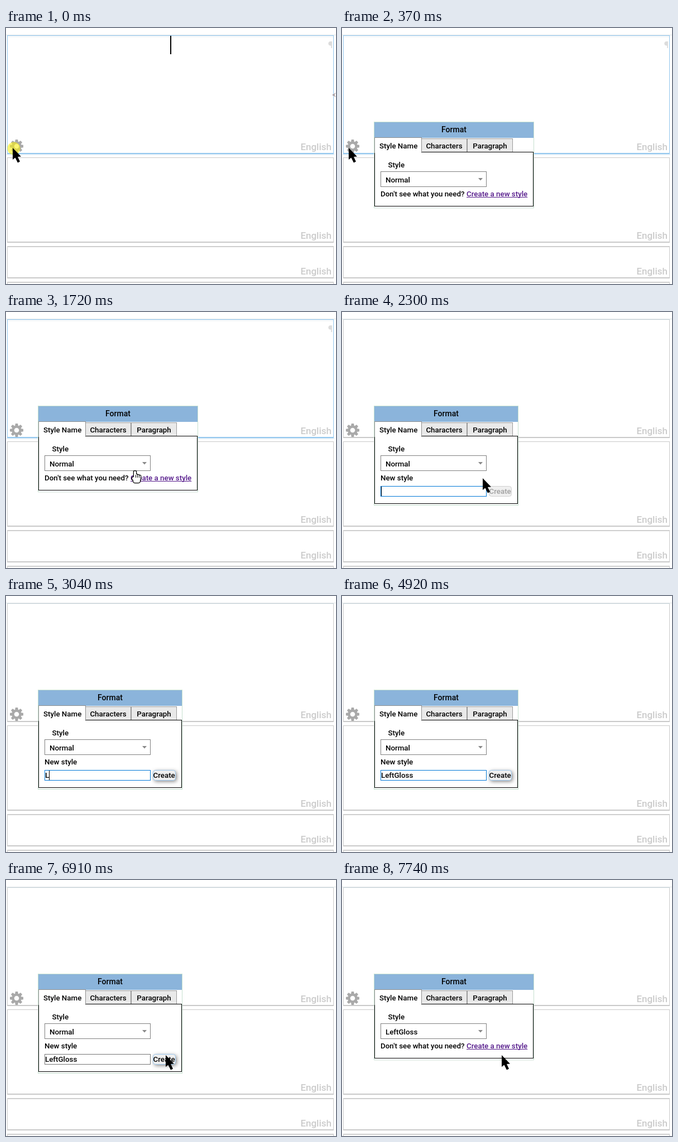
Write an HTML page with a canvas that moves like this. It is 591x459 px and loops after 8000 ms.

```html
<!DOCTYPE html>
<html lang="en">
<head>
<meta charset="utf-8">
<title>Create a style</title>
<style>
html, body { margin: 0; width: 100%; height: 100%; overflow: hidden; background: #fff; }
canvas { display: block; }
</style>
</head>
<body>
<canvas id="stage" width="591" height="459"></canvas>
<script>
const ctx = document.getElementById('stage').getContext('2d');
const LOOP = 8000;
const WORD = 'LeftGloss';
const OPEN = 370, TO_FORM = 2290, BLUR = 6790, TO_LIST = 7740;
const TYPE_START = 3040, KEY_GAP = 160, THINK = 420, BLINK = 480;
const HIDE = 2730, ENTER = 5850;

// Pointer stops: each move starts at a time, lasts ms and ends at x, y
const STOPS = [
  { at: 760, ms: 570, x: 137, y: 266 },
  { at: 1650, ms: 70, x: 231, y: 286 },
  { at: 1780, ms: 120, x: 252, y: 299 },
  { at: ENTER, ms: 0, x: 578, y: 57 },
  { at: ENTER, ms: 300, x: 293, y: 314 },
  { at: 6350, ms: 190, x: 286, y: 315 }
];

const within = (t, a, b) => t >= a && t < b;
const easeOut = k => 1 - (1 - k) ** 1.7;
const keyTime = i => TYPE_START + i * KEY_GAP + (i > 3 ? THINK : 0);

function rect(x, y, w, h, color) {
  ctx.fillStyle = color;
  ctx.fillRect(x, y, w, h);
}

function frame(x, y, w, h, color, fill) {
  if (fill) rect(x, y, w, h, fill);
  ctx.strokeStyle = color;
  ctx.lineWidth = 1;
  ctx.strokeRect(x + .5, y + .5, w - 1, h - 1);
}

function text(s, x, y, color = '#000', size = 13.33, align = 'left') {
  ctx.font = `500 ${size}px Roboto, "Noto Sans", sans-serif`;
  ctx.textAlign = align;
  ctx.fillStyle = color;
  ctx.fillText(s, x, y);
  return ctx.measureText(s).width;
}

function poly(x, y, pts, color) {
  ctx.beginPath();
  for (let i = 0; i < pts.length; i += 2) ctx.lineTo(x + pts[i], y + pts[i + 1]);
  ctx.closePath();
  ctx.fillStyle = color;
  ctx.fill();
}

function disc(x, y, r, color) {
  ctx.beginPath();
  ctx.arc(x, y, r, 0, 2 * Math.PI);
  ctx.fillStyle = color;
  ctx.fill();
}

function gear(x, y) {
  const color = '#a9a9a9';
  for (let i = 0; i < 8; i++) {
    ctx.save();
    ctx.translate(x, y);
    ctx.rotate(i * Math.PI / 4);
    poly(0, 0, [-3, -7, -2.2, -12, 2.2, -12, 3, -7], color);
    ctx.restore();
  }
  disc(x, y, 8.5, color);
  disc(x, y, 4.3, '#fff');
}

function box(y, h, color = '#c9c9c9') {
  frame(2, y, 585, h, color);
  rect(2, y + h - 2, 585, 1, color);
  if (h < 100) rect(2, y + 1, 585, 1, '#d4d4d4');
  text('English', 583, y + h - 7, '#cbcbcb', 17, 'right');
}

function page(t) {
  rect(0, 0, 591, 459, '#fff');
  rect(0, 12, 591, 1, '#e3e8ea');
  const focused = t < TO_FORM;
  if (focused) {
    rect(3, 14, 583, 3, '#f6f8f9');
    rect(1, 226, 587, 2, '#e4f0f9');
    text('¶', 585, 36, '#dcdcdc', 17, 'right');
  }
  box(13, 213, focused ? '#92c6ee' : '#c9c9c9');
  if (!focused) rect(2, 13, 585, 1, '#c3d0d6');
  box(232, 153);
  box(391, 58);
  box(455, 58);
  gear(19, 212);
  if (t < OPEN) rect(294, 14, 2, 33, '#000');
  if (t < 70) poly(584, 120, [0, 0, 7, -4, 4, 0, 7, 4], '#a89a9c');
}

function button(on) {
  ctx.save();
  if (on) {
    ctx.shadowColor = 'rgba(0,0,0,.5)';
    ctx.shadowBlur = 7;
    ctx.shadowOffsetX = ctx.shadowOffsetY = 2;
  }
  ctx.fillStyle = '#efefef';
  ctx.beginPath();
  ctx.roundRect(263.5, 312.5, 40, 18, 4);
  ctx.fill();
  ctx.restore();
  ctx.strokeStyle = on ? '#9cc8ee' : '#d0d0d0';
  ctx.lineWidth = 1;
  ctx.stroke();
  text('Create', 263.5, 326, on ? '#000' : '#a0a0a0');
}

function styleForm(t) {
  text('New style', 69, 302);
  frame(69, 312, 190, 19, t < BLUR ? '#0078d7' : '#767676', '#fff');
  let typed = 0;
  while (typed < WORD.length && t >= keyTime(typed)) typed++;
  const width = text(WORD.slice(0, typed), 70, 326);
  // The caret blinks only when typing rests
  const idle = typed ? t - keyTime(typed - 1) : 0;
  const caretOn = Math.floor((idle + 300) / BLINK) % 2 === 0;
  if (caretOn && t < BLUR) rect(Math.round(70 + width), 313, 1, 17, '#000');
  button(typed > 0);
}

function linkRow() {
  const color = '#551a8b';
  text("Don't see what you need?", 69, 302);
  const width = text('Create a new style', 223, 302, color);
  rect(223, 303, width, 1, color);
}

function tabs() {
  ['Characters', 'Paragraph'].forEach((name, i) => {
    const x = 142 + 82 * i;
    frame(x, 198, 82, 25, '#9a9a9a', '#e9e9e9');
    text(name, x + 41, 216, '#000', 13.33, 'center');
  });
  rect(142, 222, 164, 1, '#000');
  frame(58, 196, 85, 28, '#8e8e8e', '#fff');
  rect(59, 222, 83, 2, '#fff');
  text('Style Name', 67, 216);
}

function dialog(t) {
  const creating = within(t, TO_FORM, TO_LIST);
  const w = creating ? 259 : 287, h = creating ? 179 : 155;
  frame(57, 168, w, h, '#c5e0cf', '#fff');
  rect(58, 169, w - 2, 28, '#8bb4db');
  text('Format', 57 + w / 2, 187, '#000', 14, 'center');
  frame(58, 222, w - 2, h - 57, '#000', '#fff');
  tabs();
  text('Style', 82.5, 250);
  frame(69, 257, 190, 28, '#808080', '#fff');
  text(t < TO_LIST ? 'Normal' : WORD, 78, 277);
  poly(244, 269, [0, 0, 8, 0, 4, 4.5], '#888');
  if (creating) styleForm(t);
  else linkRow();
}

function pointerAt(t) {
  let x = 12, y = 216;
  for (const stop of STOPS) {
    if (t < stop.at) break;
    const k = easeOut(stop.ms ? Math.min(1, (t - stop.at) / stop.ms) : 1);
    x += (stop.x - x) * k;
    y += (stop.y - y) * k;
  }
  return [Math.round(x), Math.round(y)];
}

function arrow(x, y) {
  poly(x, y, [0, -1, 0, 20, 4.5, 16.5, 9, 25.5, 13, 23.5, 9, 15, 15, 14.5], '#000');
}

function hand(x, y) {
  ctx.beginPath();
  ctx.roundRect(x - 2, y - 1, 4, 14, 2);
  for (let i = 1; i < 4; i++) ctx.roundRect(x - 2 + 3 * i, y + 4 + i, 3, 8, 1);
  ctx.roundRect(x - 5, y + 10, 5, 5, 2);
  ctx.roundRect(x - 3, y + 10, 12, 10, 3);
  ctx.strokeStyle = '#000';
  ctx.lineWidth = 2.5;
  ctx.stroke();
  ctx.fillStyle = '#fff';
  ctx.fill();
  for (let i = 1; i < 4; i++) rect(x - 2 + 3 * i, y + 6, 1, 5, '#000');
}

function pointer(t) {
  if (within(t, HIDE, ENTER)) return;
  const [x, y] = pointerAt(t);
  const clicked = t < 120 || within(t, 1960, 2090) || within(t, BLUR, BLUR + 120);
  if (clicked) disc(x + 2, y, 11.5, `rgba(250,240,20,${within(t, 70, 120) ? .3 : .6})`);
  if (within(t, 1720, TO_FORM)) hand(x, y);
  else arrow(x, y);
}

function draw(t) {
  page(t);
  if (t >= OPEN) dialog(t);
  pointer(t);
}

const start = performance.now();
function tick() {
  draw((performance.now() - start) % LOOP);
  requestAnimationFrame(tick);
}
tick();
</script>
</body>
</html>
```
